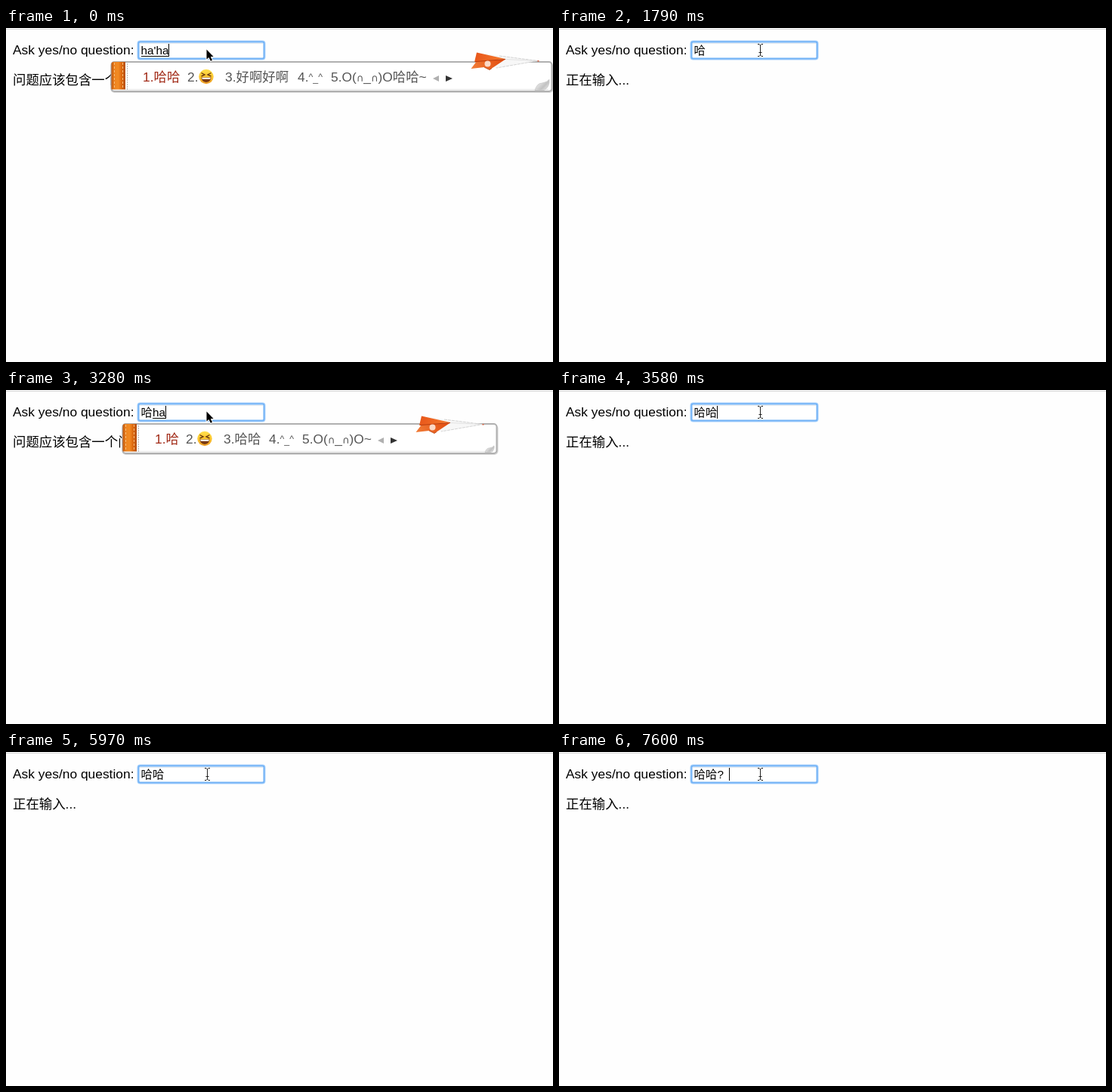
Write an HTML page with a canvas that moves like this. It is 724x443 px and loops after 8 s.

```html
<!DOCTYPE html>
<html lang="zh">
<head>
<meta charset="utf-8">
<title>Ask yes/no question</title>
<style>
html, body { margin: 0; width: 100%; height: 100%; overflow: hidden; background: #fefefe; }
canvas { display: block; width: 724px; height: 443px; }
</style>
</head>
<body>
<canvas id="stage" width="724" height="443"></canvas>
<script>
const ctx = document.getElementById('stage').getContext('2d');
const LOOP = 8000;
const FACE = '"Liberation Sans", "Noto Sans CJK SC", "Noto Sans CJK", sans-serif';
const ASK = '问题应该包含一个问号', TYPING = '正在输入...';

const CARETS = ['^', '_', '^'];
const LAUGH = ['∩', '_', '∩'];

// Candidate windows: edges, offset of each entry, entries as lists of runs
const POPUPS = {
  haha: { left: 139, right: 723, at: [42, 101, 151, 247, 291],
    items: [['哈哈'], ['grin'], ['好啊好啊'], CARETS, ['O(', ...LAUGH, ')O哈哈~']] },
  h: { left: 154, right: 616, at: [43, 84, 134, 176, 220],
    items: [['好'], ['hand'], ['和'], ['会'], ['\\(^o^)/~']] },
  ha: { left: 154, right: 650, at: [43, 84, 134, 194, 238],
    items: [['哈'], ['grin'], ['哈哈'], CARETS, ['O(', ...LAUGH, ')O~']] }
};

// Each step changes part of the state
const STEPS = [
  [0, { text: '', comp: "ha'ha", msg: ASK, caret: true, popup: 'haha', arrow: true, bob: 0, curl: 19 }],
  [150, { bob: 1, curl: 11 }],
  [300, { text: '哈哈', comp: '', msg: TYPING, popup: '', arrow: false }],
  [900, { msg: ASK, caret: false }],
  [1350, { caret: true }],
  [1790, { text: '哈', msg: TYPING, caret: false }],
  [2240, { msg: ASK }],
  [2390, { caret: true }],
  [2840, { comp: 'h', popup: 'h', arrow: true, bob: 1, curl: 9 }],
  [2990, { bob: 0, curl: 12 }],
  [3140, { comp: 'ha', popup: 'ha', bob: 1, curl: 9 }],
  [3280, { bob: 2, curl: 12 }],
  [3430, { arrow: false, bob: 1, curl: 18 }],
  [3580, { text: '哈哈', comp: '', msg: TYPING, popup: '' }],
  [4030, { msg: ASK, caret: false }],
  [4320, { text: '哈哈?', msg: TYPING, caret: true }],
  [4770, { msg: ASK, caret: false }],
  [5220, { caret: true }],
  [5670, { caret: false }],
  [5970, { text: '哈哈', msg: TYPING }],
  [6270, { caret: true }],
  [6410, { msg: ASK }],
  [6710, { caret: false }],
  [7160, { caret: true }],
  [7600, { text: '哈哈?', msg: TYPING }]
];

function stateAt(time) {
  const state = {};
  for (const [start, change] of STEPS) if (start <= time) Object.assign(state, change);
  return state;
}

function text(str, x, y, size, color = '#000', face = FACE) {
  ctx.font = `${size}px ${face}`;
  ctx.fillStyle = color;
  ctx.fillText(str, x, y);
  return ctx.measureText(str).width;
}

function rect(x, y, w, h, color) {
  ctx.fillStyle = color;
  ctx.fillRect(x, y, w, h);
}

function box(x, y, w, h, r, fill, stroke, width = 1) {
  ctx.beginPath();
  ctx.roundRect(x, y, w, h, r);
  if (fill) { ctx.fillStyle = fill; ctx.fill(); }
  if (stroke) { ctx.strokeStyle = stroke; ctx.lineWidth = width; ctx.stroke(); }
}

function poly(points, fill) {
  ctx.beginPath();
  points.forEach(([x, y]) => ctx.lineTo(x, y));
  ctx.closePath();
  ctx.fillStyle = fill;
  ctx.fill();
}

function line(points, color, width = 1, dash = []) {
  ctx.beginPath();
  points.forEach(([x, y]) => ctx.lineTo(x, y));
  ctx.strokeStyle = color;
  ctx.lineWidth = width;
  ctx.setLineDash(dash);
  ctx.stroke();
  ctx.setLineDash([]);
}

function fade(x0, y0, x1, y1, ...colors) {
  const g = ctx.createLinearGradient(x0, y0, x1, y1);
  colors.forEach((c, i) => g.addColorStop(i / (colors.length - 1), c));
  return g;
}

function drawPage(state) {
  rect(0, 0, 724, 443, '#fefefe');
  rect(0, 1, 724, 1, '#d4d4d4');
  text('Ask yes/no question:', 9, 35, 17.4);
  text(state.msg, 9, 74.5, 17.4);

  box(174.5, 17.5, 168, 24, 3, '#b4d8fd', '#a9d2fd', 2);
  box(175.5, 18.5, 166, 22, 2, '#fff', '#74b3f6', 2);
  rect(177, 20, 163, 1, '#e4e9ee');

  let x = 178.5;
  for (const ch of state.text) {
    text(ch, x, 35.3, 15.3);
    x += 15.5;
  }
  if (state.comp) {
    const w = text(state.comp, x, 35, 15.3);
    rect(Math.round(x), 37, Math.round(w), 1, '#000');
    x += w;
  }
  if (state.caret) rect(Math.round(x - 0.4), 21, 1, 17, '#000');
}

function drawGrin(x, y) {
  ctx.beginPath();
  ctx.arc(x, y, 9.7, 0, 7);
  ctx.fillStyle = fade(x, y - 10, x, y + 10, '#ffe04f', '#fdc92f', '#ec9a28');
  ctx.fill();
  for (const s of [-1, 1])
    line([[x + s * 6.5, y - 5], [x + s * 2, y - 2.5], [x + s * 6.5, y - 0.5]], '#6b3a10', 1.4);
  ctx.beginPath();
  ctx.moveTo(x - 6.5, y + 1);
  ctx.lineTo(x + 6.5, y + 1);
  ctx.bezierCurveTo(x + 6, y + 9.5, x - 6, y + 9.5, x - 6.5, y + 1);
  ctx.fillStyle = '#7a3a14';
  ctx.fill();
  rect(x - 5.5, y + 1.3, 11, 2, '#fff');
}

function drawHand(x, y) {
  ctx.save();
  ctx.lineCap = 'round';
  const skin = fade(x, y - 10, x, y + 10, '#ffd24a', '#fcbf34', '#eda02c');
  line([[x + 3, y + 4], [x - 3, y - 7]], skin, 3.4);
  line([[x + 4, y + 3], [x + 2.5, y - 8]], skin, 3.4);
  line([[x + 5, y + 4], [x + 7, y - 5.5]], skin, 3.4);
  ctx.beginPath();
  ctx.ellipse(x + 3.5, y + 4, 4.4, 5.5, 0.3, 0, 7);
  ctx.fillStyle = skin;
  ctx.fill();
  ctx.beginPath();
  ctx.arc(x - 3.5, y + 1.2, 4, 0, 7);
  ctx.strokeStyle = skin;
  ctx.lineWidth = 3;
  ctx.stroke();
  line([[x + 1, y - 2], [x + 2.4, y + 1]], '#d98a25', 0.8);
  line([[x + 4.8, y - 3], [x + 4.6, y]], '#d98a25', 0.8);
  ctx.restore();
}

function drawEntry(runs, index, x) {
  const color = index ? '#555' : '#a12a17';
  let pen = x + text(`${index + 1}.`, x, 71, 17.4, color);
  for (const run of runs) {
    if (run === 'grin') drawGrin(x + 25, 64.5);
    else if (run === 'hand') drawHand(x + 25, 65);
    else if (run === '∩') pen += text(run, pen, 71, 13, color, '"DejaVu Sans", sans-serif');
    else if (runs === CARETS) pen += text(run, pen, run === '^' ? 68.5 : 71, 12.4, color);
    else pen += text(run, pen, 71, 17.4, color);
  }
}

function drawPlane(right, bob) {
  ctx.save();
  ctx.translate(right - 108, 32 + bob);
  poly([[9, 1], [90, 11.5], [33, 21]], '#f7f7f7');
  line([[38, 5], [89, 11.5], [34, 21]], '#c9c9c9', 0.8, [4, 1]);
  line([[46, 9.5], [88, 11.5]], '#dcdcdc', 0.8);
  poly([[8, 0.5], [46, 9], [5, 13]], fade(8, 0, 40, 12, '#e8571a', '#f5782d'));
  poly([[0.5, 22], [8, 12], [46, 9.5], [25, 23.5], [18, 20]], fade(4, 22, 40, 9, '#f07a35', '#e34f12'));
  line([[6, 12.6], [46, 9.5]], '#b93a0a', 1);
  line([[18, 20], [25, 23.5], [28, 21.5]], '#b54212', 0.8);
  ctx.beginPath();
  ctx.arc(22.5, 15.5, 4, 0, 7);
  ctx.fillStyle = '#fbd9c6';
  ctx.fill();
  rect(88.5, 11, 2, 1.5, '#d8603c');
  ctx.restore();
}

function drawCurl(right, size) {
  const x = right - 4, y = 83.5, s = size;
  ctx.beginPath();
  ctx.moveTo(x - s, y - 1);
  ctx.quadraticCurveTo(x - s * 0.85, y - s * 0.55, x - s * 0.5, y - s * 0.55);
  ctx.quadraticCurveTo(x - s * 0.15, y - s * 0.6, x, y - s * 0.8);
  ctx.quadraticCurveTo(x + 1, y - s * 0.3, x - s * 0.35, y - 1);
  ctx.closePath();
  ctx.fillStyle = fade(x - s * 0.7, y - s * 0.7, x, y, '#ececec', '#c2c2c2', '#f8f8f8');
  ctx.fill();
  ctx.strokeStyle = '#c4c4c4';
  ctx.lineWidth = 0.7;
  ctx.stroke();
}

function drawPopup({ left, right, at, items }, bob, curl) {
  const width = right - left;
  box(left - 0.5, 46, width + 2, 40, 5, 'rgba(0,0,0,.16)');
  box(left + 0.5, 45, width - 1, 39, 4, '#fff', '#b0b0b0', 2);
  line([[left + 4, 81.5], [right - 5, 81.5]], '#e3e3e3');

  // Stitched orange spine
  box(left + 0.5, 45, 18.5, 36.5, [3, 0, 0, 1],
    fade(left, 0, left + 19, 0, '#b8500a', '#ee8420', '#f28a22', '#dc6810', '#b24c08'));
  line([[left + 4.5, 46], [left + 4.5, 81]], '#f9bd78', 1, [3, 2]);
  line([[left + 15.5, 46], [left + 15.5, 81]], '#f9bd78', 1, [3, 2]);
  line([[left + 21.5, 47], [left + 21.5, 82]], '#b5b5b5', 1, [2, 1]);

  items.forEach((runs, i) => drawEntry(runs, i, left + at[i]));
  poly([[right - 150, 63], [right - 158, 67], [right - 150, 71]], '#b0b0b0');
  poly([[right - 141, 63], [right - 132, 67], [right - 141, 71]], '#333');
  drawCurl(right, curl);
  drawPlane(right, bob);
}

function drawPointer(arrow) {
  if (arrow) {
    const shape = [[265.5, 28.5], [265.5, 41.5], [268.5, 39], [270.8, 43.8],
      [273, 42.8], [270.8, 38], [274.6, 38]];
    line([...shape, shape[0], shape[1]], '#fff', 2);
    poly(shape, '#000');
    return;
  }
  line([[263, 21.5], [265, 21.5], [266.5, 23], [268, 21.5], [270, 21.5]], '#222');
  line([[266.5, 23], [266.5, 36]], '#222');
  line([[263, 37.5], [265, 37.5], [266.5, 36], [268, 37.5], [270, 37.5]], '#222');
  line([[264.5, 32.5], [268.5, 32.5]], '#222');
}

function frame() {
  const state = stateAt(performance.now() % LOOP);
  drawPage(state);
  if (state.popup) drawPopup(POPUPS[state.popup], state.bob, state.curl);
  drawPointer(state.arrow);
  requestAnimationFrame(frame);
}
frame();
</script>
</body>
</html>
```
